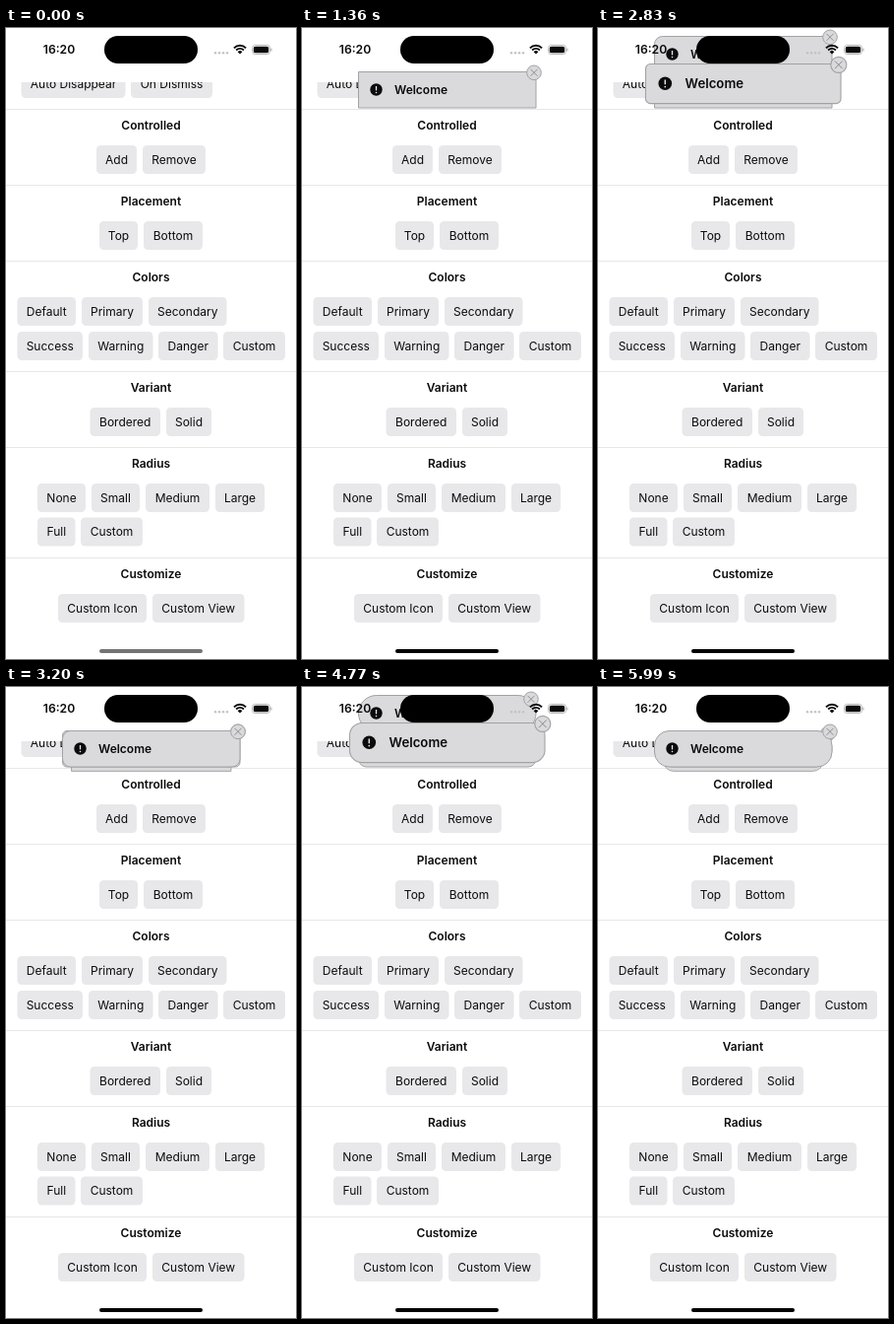
Animation of 295x640 px, one loop 6970 ms. Source, as an HTML page with a canvas:

```html
<!DOCTYPE html>
<html lang="en">
<head>
<meta charset="utf-8">
<title>Toast radius demo</title>
<style>
  html, body { margin: 0; width: 100%; height: 100%; overflow: hidden; background: #fff; }
  canvas { display: block; width: 295px; height: 640px; }
</style>
</head>
<body>
<canvas id="stage"></canvas>
<script>
const W = 295, H = 640, LOOP = 6970;
const canvas = document.getElementById('stage');
const ctx = canvas.getContext('2d');
const dpr = window.devicePixelRatio || 1;
canvas.width = W * dpr;
canvas.height = H * dpr;

const INK = '#0b0b0c', BUTTON = '#e8e8ea', TOAST = '#dadadc', EDGE = '#a2a2a4';

// Each row: top edge, then label, left, right of every button.
const rows = [
  [42, 'Auto Disappear', 15.5, 121.5, 'On Dismiss', 127, 210],
  [119, 'Add', 92, 133, 'Remove', 139, 203],
  [196, 'Top', 95, 134, 'Bottom', 140, 200],
  [273, 'Default', 11.5, 71, 'Primary', 77, 139, 'Secondary', 145, 224.5],
  [308, 'Success', 11.5, 78, 'Warning', 84, 149.5, 'Danger', 155, 215.5, 'Custom', 221, 284],
  [385, 'Bordered', 85.5, 157, 'Solid', 163, 209],
  [462, 'None', 32, 81, 'Small', 87, 136, 'Medium', 142, 207, 'Large', 213, 263],
  [496.5, 'Full', 32, 70.5, 'Custom', 76, 139],
  [574, 'Custom Icon', 53, 143, 'Custom View', 149, 242.5]
];
const sections = [
  ['Controlled', 99], ['Placement', 176], ['Colors', 253],
  ['Variant', 365], ['Radius', 442], ['Customize', 554]
];

// Arrival, midway and settled times; entry height, corner radius, close inset.
const toasts = [
  { at: [1130, 1245, 1360], y: 8, r: 0, inset: 0 },
  { at: [1920, 2040, 2180], y: 8, r: 4.5, inset: 0 },
  { at: [2830, 2940, 3200], y: 8, r: 8, inset: 0 },
  { at: [3670, 3780, 4050], y: 12, r: 11.5, inset: 0 },
  { at: [4770, 4870, 5020], y: 8, r: 18.25, inset: 3 },
  { at: [5610, 5720, 5990], y: 12, r: 15, inset: 0 }
];
const BOX = { x: 57.5, y: 44.5, w: 180.5, h: 36.5 };

function box(x, y, w, h, r, fill, stroke) {
  ctx.beginPath();
  ctx.roundRect(x, y, w, h, r);
  if (fill) { ctx.fillStyle = fill; ctx.fill(); }
  if (stroke) { ctx.strokeStyle = stroke; ctx.stroke(); }
}

function disc(x, y, r, fill, stroke) {
  box(x - r, y - r, 2 * r, 2 * r, r, fill, stroke);
}

function line(color, width, ...p) {
  ctx.strokeStyle = color;
  ctx.lineWidth = width;
  ctx.beginPath();
  for (let i = 0; i < p.length; i += 4) {
    ctx.moveTo(p[i], p[i + 1]);
    ctx.lineTo(p[i + 2], p[i + 3]);
  }
  ctx.stroke();
}

function text(str, x, y, weight, align = 'center', size = 12) {
  ctx.font = `${weight} ${size}px Inter, "Liberation Sans", sans-serif`;
  ctx.textAlign = align;
  ctx.textBaseline = 'alphabetic';
  ctx.fillStyle = INK;
  ctx.fillText(str, x, y + size * 0.363);
}

function drawPage() {
  ctx.save();
  ctx.beginPath();
  ctx.rect(0, 55, W, H - 55);
  ctx.clip();
  for (const [top, ...items] of rows) {
    for (let i = 0; i < items.length; i += 3) {
      const [label, left, right] = items.slice(i, i + 3);
      box(left, top, right - left, 29, 4.5, BUTTON);
      text(label, (left + right) / 2, top + 14.5, 400);
    }
  }
  for (const [title, y] of sections) {
    line('#e7e7e9', 1, 0, y - 16.5, W, y - 16.5);
    text(title, 147.5, y, 600);
  }
  ctx.restore();
}

function drawToast({ r, inset }, top, depth) {
  const { x, y, w, h } = BOX;
  const cx = x + w / 2, cy = y + h / 2, scale = 1 - depth * 0.1;
  ctx.save();
  ctx.translate(cx, cy + top - 44 + depth * 6.2);
  ctx.scale(scale, scale);
  ctx.translate(-cx, -cy);
  ctx.lineWidth = 1;
  box(x, y, w, h, r, TOAST, EDGE);
  disc(75.5, 62.5, 6.2, INK);
  line('#e8e8e8', 1.3, 75.5, 59, 75.5, 63.4);
  disc(75.5, 65.5, 0.8, '#e8e8e8');
  text('Welcome', 94, 62.5, 600, 'left');
  const bx = 236 - inset, by = 45.3 + inset;
  ctx.lineWidth = 1;
  disc(bx, by, 7.3, TOAST, EDGE);
  line('#88888a', 0.9, bx - 3.5, by - 3.5, bx + 3.5, by + 3.5, bx + 3.5, by - 3.5, bx - 3.5, by + 3.5);
  ctx.restore();
}

function drawToasts(t) {
  const shown = toasts.filter(toast => t >= toast.at[0]).slice(-3);
  if (!shown.length) return;
  const newest = shown[shown.length - 1];
  const step = newest.at.filter(at => t >= at).length - 1;
  const shift = [0, 0.6, 1][step];
  const top = [newest.y, newest.y + 24, 44][step];
  if (step === 0) drawToast(newest, top, 0);
  shown.slice(0, -1).forEach((toast, i) => {
    drawToast(toast, 44, shown.length - 3 - i + 1 - 1 + shift);
  });
  if (step > 0) drawToast(newest, top, 0);
}

function drawStatus(t) {
  text('16:20', 54, 22, 600, 'center', 12.2);
  box(100, 8, 95, 28, 14, '#000');
  for (let i = 0; i < 4; i++) disc(213 + i * 4, 25.3, 1.2, '#c2c2c4');

  ctx.strokeStyle = INK;
  ctx.lineWidth = 1.9;
  for (const r of [8.6, 5.5]) {
    ctx.beginPath();
    ctx.arc(238, 26.4, r, -Math.PI * 0.75, -Math.PI * 0.25);
    ctx.stroke();
  }
  ctx.fillStyle = INK;
  ctx.beginPath();
  ctx.moveTo(238, 26.6);
  ctx.arc(238, 26.6, 3.3, -Math.PI * 0.75, -Math.PI * 0.25);
  ctx.fill();

  ctx.lineWidth = 0.8;
  box(250.5, 17.4, 18, 9.2, 3, null, '#a6a6a8');
  box(251.8, 18.7, 15.4, 6.6, 1.9, INK);
  box(269.4, 20.5, 1, 3, 0.6, '#a6a6a8');

  box(95, 630, 105, 4, 2, t < 1130 ? '#747474' : '#000');
}

function frame(now) {
  const t = now % LOOP;
  ctx.setTransform(dpr, 0, 0, dpr, 0, 0);
  ctx.fillStyle = '#fff';
  ctx.fillRect(0, 0, W, H);
  drawPage();
  drawToasts(t);
  drawStatus(t);
}

const start = performance.now();
function tick() {
  frame(performance.now() - start);
  requestAnimationFrame(tick);
}
tick();
</script>
</body>
</html>
```
